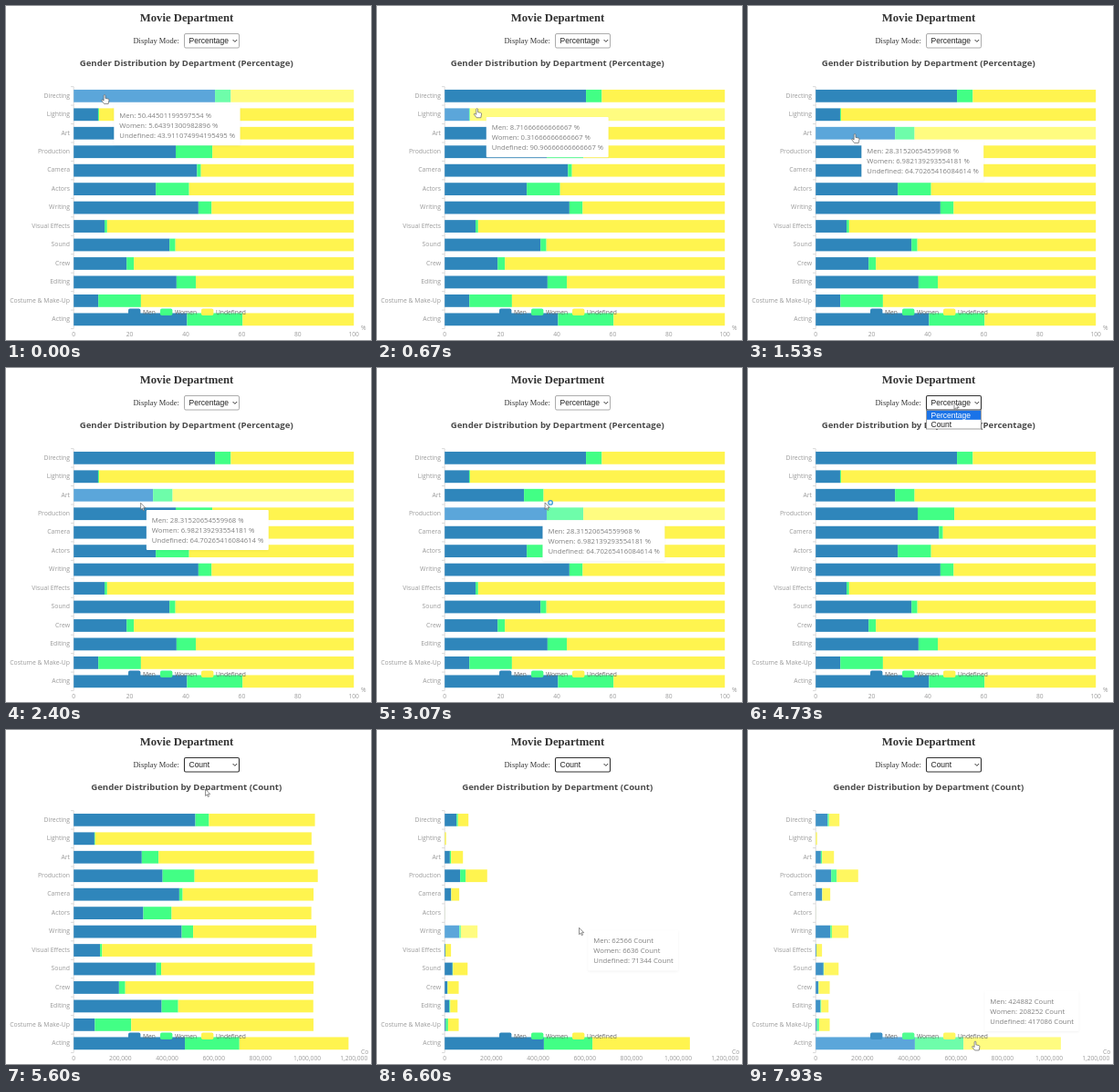
Animation of 400x367 px, one loop 8 s. Source, as an HTML page:

```html
<!DOCTYPE html>
<html lang="en">
<head>
<meta charset="utf-8">
<title>Movie Department</title>
<style>
  html, body { margin: 0; width: 100%; height: 100%; overflow: hidden; background: #fff; }
  svg { display: block; width: 400px; height: 367px; }
  text { font-family: "Open Sans", "Noto Sans", sans-serif; white-space: pre; }
  .serif { font-family: "Liberation Serif", Times, serif; }
  .ui { font: 8.5px "Liberation Sans", Arial, sans-serif; fill: #222; }
  .axis { font-size: 6.7px; fill: #999; }
  .name { font-size: 6.85px; fill: #999; }
  .legend { font-size: 6.7px; fill: #666; }
  .tip { font-size: 7.7px; fill: #808080; }
</style>
</head>
<body>
<svg id="stage" viewBox="0 0 400 367"></svg>
<script>
const LOOP = 8000, LEFT = 74.2, WIDTH = 307, TOP = 88.6, BAND = 20.46, BAR = 13.8;
const MAX = 1200000, SWITCH = 5433, MORPH = 500, LAG = 70;
const COLORS = [[47, 134, 187], [66, 255, 133], [255, 244, 79]];
const LIFTED = [[91, 166, 218], [110, 253, 170], [255, 252, 128]];
const SERIES = ['Men', 'Women', 'Undefined'];

// name, total, men %, women %, undefined % when its rounding matters
const ROWS = [
  ['Directing', 101640, 50.44501199597554, 5.64391300982896, '43.911074994195495'],
  ['Lighting', 6000, 8.71666666666667, 0.31666666666667],
  ['Art', 78200, 28.31520654559968, 6.982139293554181, '64.70265416084614'],
  ['Production', 182000, 36.41870251934418, 13.08412960275331],
  ['Camera', 62300, 44.01284109149277, 1.412520064205457],
  ['Actors', 500, 29.3, 11.9],
  ['Writing', 140546, 44.51638609, 4.72158582],
  ['Visual Effects', 27000, 11.03703703703704, 0.88888888888889],
  ['Sound', 98000, 34.20408163265306, 2.10204081632653],
  ['Crew', 60000, 18.89833333333333, 2.60166666666667],
  ['Editing', 55000, 36.70181818181818, 6.90181818181818],
  ['Costume & Make-Up', 60000, 8.80166666666667, 15.20166666666667],
  ['Acting', 1050220, 40.456476, 19.829369]
];

// time, x, y of the pointer
const PATH = [
  [0, 108, 97.5], [70, 108, 97.5], [800, 110, 116], [1330, 110, 116],
  [1460, 114, 137], [1530, 117, 140.5], [2130, 140, 142], [2270, 140, 142],
  [2750, 168, 165], [2930, 169, 164], [3000, 171, 157], [3070, 184, 148],
  [3500, 225, 110], [3730, 235, 98], [3800, 236, 97], [4000, 237, 94],
  [4270, 226, 38], [4730, 226, 38], [5200, 219, 62], [5530, 218.5, 65],
  [6400, 218.5, 65], [6530, 221, 209], [6550, 221, 212.5], [6600, 221.5, 217],
  [6800, 225, 270], [7200, 236, 350], [7270, 236, 350], [7800, 249, 342], [8000, 249, 342]
];

const stage = document.getElementById('stage');

function add(tag, attrs, parent = stage, label) {
  const el = document.createElementNS('http://www.w3.org/2000/svg', tag);
  set(el, attrs);
  if (label !== undefined) el.textContent = label;
  parent.appendChild(el);
  return el;
}
function set(el, attrs) {
  for (const k in attrs) el.setAttribute(k, attrs[k]);
}
const text = (label, x, y, attrs, parent) => add('text', { x, y, ...attrs }, parent, label);
const show = (el, on) => { el.style.display = on ? '' : 'none'; };
const mix = (a, b, p) => a + (b - a) * p;
const tint = (i, p) => `rgb(${COLORS[i].map((c, k) => Math.round(mix(c, LIFTED[i][k], p)))})`;
const clamp = p => Math.max(0, Math.min(1, p));
const cubicInOut = p => p < 0.5 ? 4 * p ** 3 : 1 - (2 - 2 * p) ** 3 / 2;

function rowAt(y) {
  const row = Math.floor((y - TOP) / BAND);
  return row >= 0 && row < ROWS.length ? row : -1;
}

function pointerAt(t) {
  t = Math.max(0, t);
  const i = Math.max(1, PATH.findIndex(k => k[0] > t));
  const [a, b] = [PATH[i - 1], PATH[i]];
  const p = (t - a[0]) / (b[0] - a[0]);
  return [mix(a[1], b[1], p), mix(a[2], b[2], p)];
}

// header
text('Movie Department', 198, 17, { class: 'serif', 'font-size': 12.7, 'font-weight': 700, 'text-anchor': 'middle', fill: '#333' });
text('Display Mode:', 139.5, 41, { class: 'serif', 'font-size': 8.45, fill: '#333' });
const field = add('rect', { x: 195.5, y: 30.5, width: 60, height: 15.5, rx: 1.5, fill: '#fff' });
const choice = text('', 200.5, 41.2, { class: 'ui' });
add('path', { d: 'M248.6 37l2.3 2.4 2.3-2.4', fill: 'none', stroke: '#333', 'stroke-width': 1 });
const title = text('', 197.7, 66.4, { 'font-size': 9.65, 'font-weight': 700, 'text-anchor': 'middle', fill: '#4a4a4a' });

// axes
const ticks = ROWS.map((_, i) => `M71 ${TOP + i * BAND}h3`).join('') + `M71 ${TOP + 13 * BAND}h3`;
add('path', { d: `M${LEFT} ${TOP}v${13 * BAND}${ticks}`, fill: 'none', stroke: '#ccc', 'stroke-width': 0.7 });
const axes = [
  { unit: '%', step: 20, count: 6 },
  { unit: 'Co', step: 200000, count: 7 }
].map(({ unit, step, count }) => {
  const g = add('g', { class: 'axis' });
  for (let i = 0; i < count; i++)
    text((i * step).toLocaleString('en-US'), LEFT + WIDTH * i / (count - 1), 363.4, { 'text-anchor': 'middle' }, g);
  text(unit, 389, 356, {}, g);
  return g;
});

// bars
const bars = ROWS.map(([name], i) => {
  const mid = TOP + (i + 0.5) * BAND;
  text(name, 70, mid + 1.8, { class: 'name', 'text-anchor': 'end' });
  return SERIES.map(() => add('rect', { y: mid - BAR / 2, height: BAR }));
});

// legend
const keys = [134, 169, 214].map((x, i) => {
  text(SERIES[i], x + 16, 338.6, { class: 'legend' });
  return add('rect', { x, y: 332.6, width: 13.4, height: 7.4, rx: 1.8 });
});

// tooltip
const tip = add('g', {});
const tipBox = add('rect', { height: 44.2, rx: 1, fill: '#fff', style: 'filter:drop-shadow(0 1px 1px rgba(0,0,0,.05))' }, tip);
const tipLines = SERIES.map((_, i) => text('', 6, 14.1 + i * 11, { class: 'tip' }, tip));

// drop-down list
const list = add('g', {});
add('rect', { x: 195.5, y: 46.5, width: 60, height: 20.5, fill: '#fff', stroke: '#777', 'stroke-width': 0.7 }, list);
const mark = add('rect', { x: 196, width: 59, height: 10, fill: '#1a73e8' }, list);
const options = ['Percentage', 'Count'].map((s, i) => text(s, 200.5, 54.7 + i * 10, { class: 'ui' }, list));

// pointers
const pen = { fill: '#fff', stroke: '#555', 'stroke-width': 0.65, 'stroke-linejoin': 'round' };
const arrow = add('path', { d: 'M0 0v7.4l1.7-1.5 1.2 2.5 1.1-.5-1.1-2.5h2.3z', ...pen });
const hand = add('path', { d: 'M-.9.6q.9-1.3 1.8 0v3.3l3.2.7q1 .3.8 1.5l-.7 3.9h-4.7l-2.7-3.5q-.4-1.2.8-1l1.5 1z', ...pen });
const ring = add('circle', { r: 2.3, fill: '#dff1fb', stroke: '#3b9ad0', 'stroke-width': 1.2 });

function values(row, counting) {
  const [, total, men, women, rest] = ROWS[row];
  if (!counting) return [men, women, rest || 100 - men - women].map(v => v + ' %');
  const m = Math.round(total * men / 100), w = Math.round(total * women / 100);
  return [m, w, total - m - w].map(v => v + ' Count');
}

function drawBars(t, lit) {
  const e = cubicInOut(clamp((t - SWITCH) / MORPH));
  const glow = clamp((t - 7300) / 400) * 0.35;
  const lengthOf = total => WIDTH * mix(1, total / MAX, e);
  ROWS.forEach(([, total, men, women], r) => {
    const span = lengthOf(total) / 100;
    let x = LEFT;
    [men, women, 100 - men - women].forEach((v, i) => {
      set(bars[r][i], { x, width: v * span, fill: tint(i, r === lit ? 1 : glow) });
      x += v * span;
    });
  });
  keys.forEach((k, i) => set(k, { fill: tint(i, glow) }));
  return lengthOf;
}

function drawTip(t, row, counting) {
  show(tip, row >= 0);
  if (row < 0) return;
  const [x, y] = pointerAt(t - LAG);
  const top = y + 55 > 352 ? y - 55.2 : y + 11;
  values(row, counting).forEach((v, i) => { tipLines[i].textContent = `${SERIES[i]}: ${v}`; });
  const width = Math.max(...tipLines.map(l => l.getComputedTextLength())) + 11.5;
  set(tipBox, { width });
  set(tip, { transform: `translate(${x + 10.3} ${top})` });
}

function drawPointer(t, x, y, row, lengthOf) {
  const busy = t >= 2990 && t < 3200;
  const onBar = row >= 0 && !busy && x < LEFT + lengthOf(ROWS[row][1])
    && Math.abs(y - TOP - (row + 0.5) * BAND) < BAR / 2;
  const move = { transform: `translate(${x} ${y})` };
  show(hand, onBar);
  show(arrow, !onBar);
  show(ring, busy);
  set(hand, move);
  set(arrow, move);
  set(ring, { cx: x + 6, cy: y });
}

function draw(t) {
  const counting = t >= SWITCH, focus = t >= 4400;
  const mode = counting ? 'Count' : 'Percentage';
  title.textContent = `Gender Distribution by Department (${mode})`;
  choice.textContent = mode;
  set(field, { stroke: focus ? '#333' : '#888', 'stroke-width': focus ? 1.1 : 0.7 });
  axes.forEach((g, i) => show(g, counting === !!i));

  const [x, y] = pointerAt(t);
  const row = rowAt(y);
  const lengthOf = drawBars(t, row < 0 ? -1 : rowAt(pointerAt(t - 50)[1]));
  drawTip(t, row, counting);

  show(list, t >= 4470 && !counting);
  const pick = y > 56.5 ? 1 : 0;
  set(mark, { y: 46.8 + pick * 10 });
  options.forEach((o, i) => { o.style.fill = i === pick ? '#fff' : '#222'; });
  drawPointer(t, x, y, row, lengthOf);
}

const start = performance.now();
function tick() {
  draw((performance.now() - start) % LOOP);
  requestAnimationFrame(tick);
}
tick();
</script>
</body>
</html>
```
